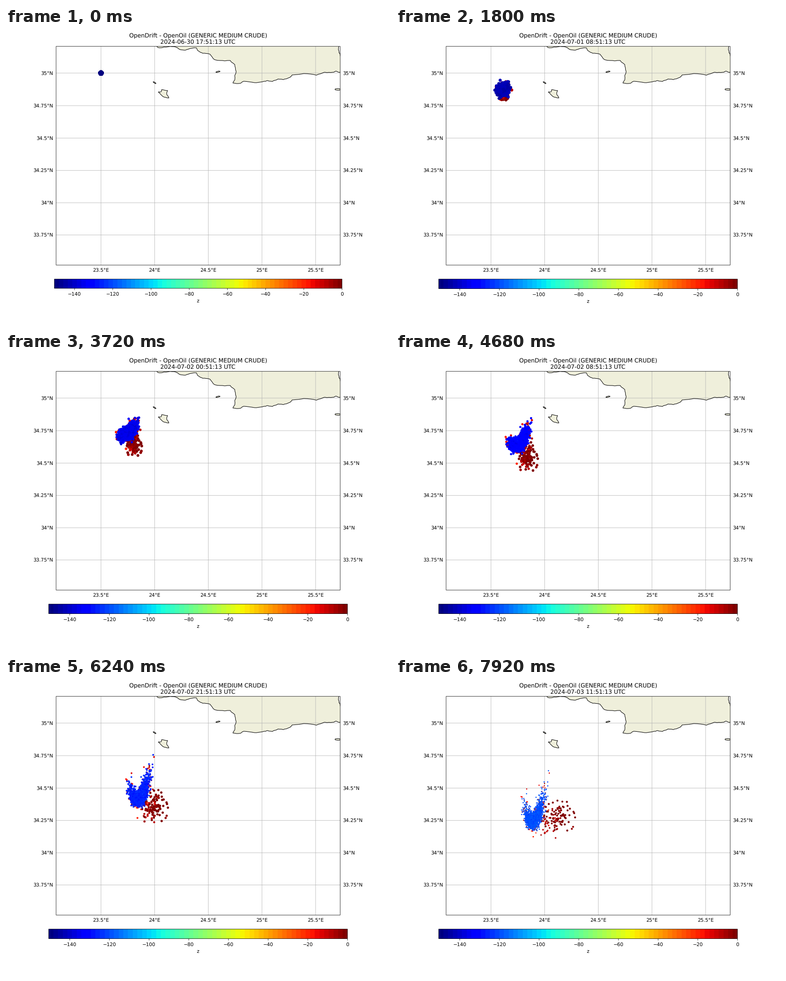
A matplotlib script that plays this animation: 851 px wide and 658 px high, repeating every 8 s.

```python
import numpy as np
import matplotlib.pyplot as plt
from matplotlib.animation import FuncAnimation
from matplotlib.patches import Polygon, Rectangle

W, H = 851, 658
LEFT, RIGHT, TOP, BOTTOM = 111, 740.7, 40.7, 525.2
START = np.array([210.5, 99.9])   # release point at 23.5E 35N
PX_PER_DEG = 237.8
HOURS, ZMIN = 66, -150.6
THIN, BIG, SMALL = 0.8, 12.89, 10.745

plt.rcParams["font.family"] = "DejaVu Sans"
plt.rcParams["text.hinting"] = "none"
rng = np.random.default_rng(12)
jet = plt.get_cmap("jet", 64)

# At 72 dpi one point is one pixel
fig = plt.figure(figsize=(W / 72, H / 72), dpi=72, facecolor="white")
ax = fig.add_axes([0, 0, 1, 1])
ax.set_xlim(0, W)
ax.set_ylim(H, 0)
ax.axis("off")


def label(x, y, s, size=SMALL, ha="center"):
    return ax.text(x, y, s, fontsize=size, ha=ha, va="baseline")


def line(x, y, color="black", z=5):
    return ax.plot(x, y, color=color, lw=THIN, zorder=z, snap=False,
                   solid_capstyle="butt")[0]


def box(x0, y0, x1, y1):
    return ax.add_patch(Rectangle((x0, y0), x1 - x0, y1 - y0, fill=False,
                                  ec="black", lw=THIN, zorder=6, snap=False))


def mercator(lat):
    """WGS84 Mercator northing in degrees."""
    s, e = np.sin(np.radians(lat)), 0.0818
    return np.degrees(np.arctanh(s) - e * np.arctanh(e * s))


frame = box(LEFT, TOP, RIGHT, BOTTOM)

# ---- grid and labels ----
for lon in np.arange(23.5, 25.6, 0.5):
    x = START[0] + PX_PER_DEG * (lon - 23.5)
    line([x, x], [TOP, BOTTOM], "#b0b0b0", 2)
    label(x, 540, f"{lon:g}°E")

for lat in np.arange(33.75, 35.1, 0.25):
    y = START[1] + PX_PER_DEG * (mercator(35) - mercator(lat))
    line([LEFT, RIGHT], [y, y], "#b0b0b0", 2)
    label(104.5, y + 3.6, f"{lat:g}°N", ha="right")
    label(746, y + 3.6, f"{lat:g}°N", ha="left")

label(425.5, 21, "OpenDrift - OpenOil (GENERIC MEDIUM CRUDE)", BIG)
clock = label(425.5, 34.4, "", BIG)


# ---- coast ----
def rough(points, amount, levels=2):
    """Fractal line: shift the midpoint of every segment, then repeat."""
    p = np.array(points, float)
    for _ in range(levels):
        mid = (p[1:] + p[:-1]) / 2
        mid += rng.uniform(-amount, amount, mid.shape)
        p = np.insert(p, np.arange(1, len(p)), mid, axis=0)
        amount *= 0.7
    return p


def land(points, corner=None, fill="#efefdb"):
    """Fill the points (closed through corner) and ink the shoreline."""
    area = points if corner is None else np.vstack([points, corner])
    patch = ax.add_patch(Polygon(area, fc=fill, ec="none", zorder=1))
    shore, = ax.plot(*points.T, color="black", lw=1.07, zorder=3)
    patch.set_clip_path(frame)
    shore.set_clip_path(frame)


def isle(x, y, rx, ry, tilt=0.0):
    a = np.linspace(0, 2 * np.pi, 9)
    dx = rx * np.cos(a)
    land(rough(np.c_[x + dx, y + ry * np.sin(a) + tilt * dx], 0.4, 1))


corner = (RIGHT, TOP)
land(rough([
    (332, 40), (341, 44), (360, 41.5), (376, 42), (384, 47), (398, 49),
    (406, 46), (422, 44), (425, 50), (436, 56), (452, 58), (462, 70),
    (474, 72), (497, 72), (507, 81), (510, 96), (507, 106), (507, 115),
    (503, 122), (519, 122.5), (527, 118), (550, 121), (569, 119),
    (580, 116.5), (590, 118.5), (603, 113), (614, 114.5), (630, 109),
    (634, 104), (660, 101), (688, 104.5), (706, 98), (725, 98),
    (731, 95.5), (741, 98)], 0.9), corner)
land(rough([(737, 40), (736.5, 48), (738, 55), (741, 62)], 0.9), corner,
     "white")
land(rough([(338, 142), (344, 141), (345, 136.5), (358, 138.5), (356, 146),
            (361, 155), (350, 153), (338, 142)], 0.6))
isle(329, 121, 3, 1.2, 0.6)
isle(469.5, 97, 4.5, 1.2, -0.2)
isle(735.5, 136, 6.5, 2)


# ---- colour bars ----
def color_bar(x0, x1, y1, text_y):
    y0 = 556.2
    parts = [ax.pcolormesh(np.linspace(x0, x1, 65), [y0, y1],
                           np.arange(64)[None], cmap=jet, zorder=4),
             box(x0, y0, x1, y1), label(425.5, text_y + 15, "z")]
    for v in range(-140, 1, 20):
        x = x1 + v * (x1 - x0) / -ZMIN
        parts += [line([x, x], [y1, y1 + 3.8]),
                  label(x, text_y, str(v).replace("-", "\u2212"))]
    return parts


first_bar = color_bar(107.2, 744.7, 576.8, 593)
main_bar = color_bar(94.6, 756.8, 577.6, 594)

# ---- particles ----
N_RED, N_SLICK, N_BLUE = 260, 125, 2300
N_ALL = N_RED + N_SLICK + N_BLUE

n_cloud = N_RED + N_BLUE
reach = np.where(np.arange(n_cloud) < N_RED, 1.25, 1)
arm = np.clip(0.4 * reach * rng.standard_normal(n_cloud), -1.35, 1.35)[:, None]
noise = reach[:, None] * rng.standard_normal((n_cloud, 2))
red_z = rng.uniform(-22, 0, N_RED)
blue_dz = rng.normal(0, 1.3, N_BLUE)

# Surface oil: age 1 leads the slick, lower ages trail behind
age = 1 - 0.75 * rng.random(N_SLICK) ** 2
slick_noise = np.clip(rng.standard_normal((N_SLICK, 2)), -2.2, 2.2)
slick_z = -32 * (1 - age) * rng.random(N_SLICK)

dots = ax.scatter(*np.zeros((2, N_ALL)), s=1, c=np.zeros(N_ALL), cmap=jet,
                  vmin=ZMIN, vmax=0, linewidths=0, zorder=4)


def center(t):
    """Steady drift, a late southward push and an inertial oscillation."""
    swing = 5 * min(t / 20, 1) ** 2 * np.cos(2 * np.pi * (t - 51) / 20.9)
    push = 58 / (1 + np.exp((48 - t) / 4.6))
    return START + (1.45 * t + 10 * np.sin(np.pi * t / HOURS) ** 2 + swing,
                    2.43 * t + push)


def cloud(t):
    """Round at first, then sheared and bent into a U."""
    span = 21 * np.tanh((t / 30) ** 2) * np.array([1, -0.8])
    bend = np.array([3, -48]) * np.clip((t - 27) / 30, 0, 1)
    spread = min(t / 15, 1) * np.array([4.5, 4.5 + t / 22])
    return center(t) + arm * span + arm ** 2 * bend + noise * spread


def slick(t):
    lead = np.array([61 * (t / HOURS) ** 1.8,
                     28 * np.sin(np.pi * (t / 59) ** 1.5)])
    sag = np.c_[0 * age, 20 * (1 - age)] * min(t / 40, 1)
    spread = np.array([0.24 * t, min(0.36 * t, 16)])
    return center(t) + age[:, None] * lead + sag + slick_noise * spread


def update(i):
    t = min(i // 3, HOURS)
    day, h = divmod(17 + t, 24)
    date = f"07-{day:02d}" if day else "06-30"
    clock.set_text(f"2024-{date} {h:02d}:51:13 UTC")
    for part in first_bar:
        part.set_visible(t == 0)
    for part in main_bar:
        part.set_visible(t > 0)

    xy = cloud(t)
    dots.set_offsets(np.vstack([xy[:N_RED], slick(t), xy[N_RED:]]))
    blue_z = -150 + 0.46 * t + blue_dz * min(t / 20, 1)
    dots.set_array(np.concatenate([red_z, slick_z, blue_z]))

    fresh = 4 * np.exp(-t / 4)
    small = 8 - 0.08 * t + fresh
    large = 7.8 - 0.05 * t + fresh
    size = np.full(N_ALL, small)
    size[N_RED:N_RED + N_SLICK] += (large - small) * age
    dots.set_sizes(size ** 2)
    return [dots, clock]


# Three ticks of 40 ms per hour, the last hour lasts two
anim = FuncAnimation(fig, update, frames=200, interval=40, repeat=True,
                     repeat_delay=0, blit=False)
plt.show()
```
